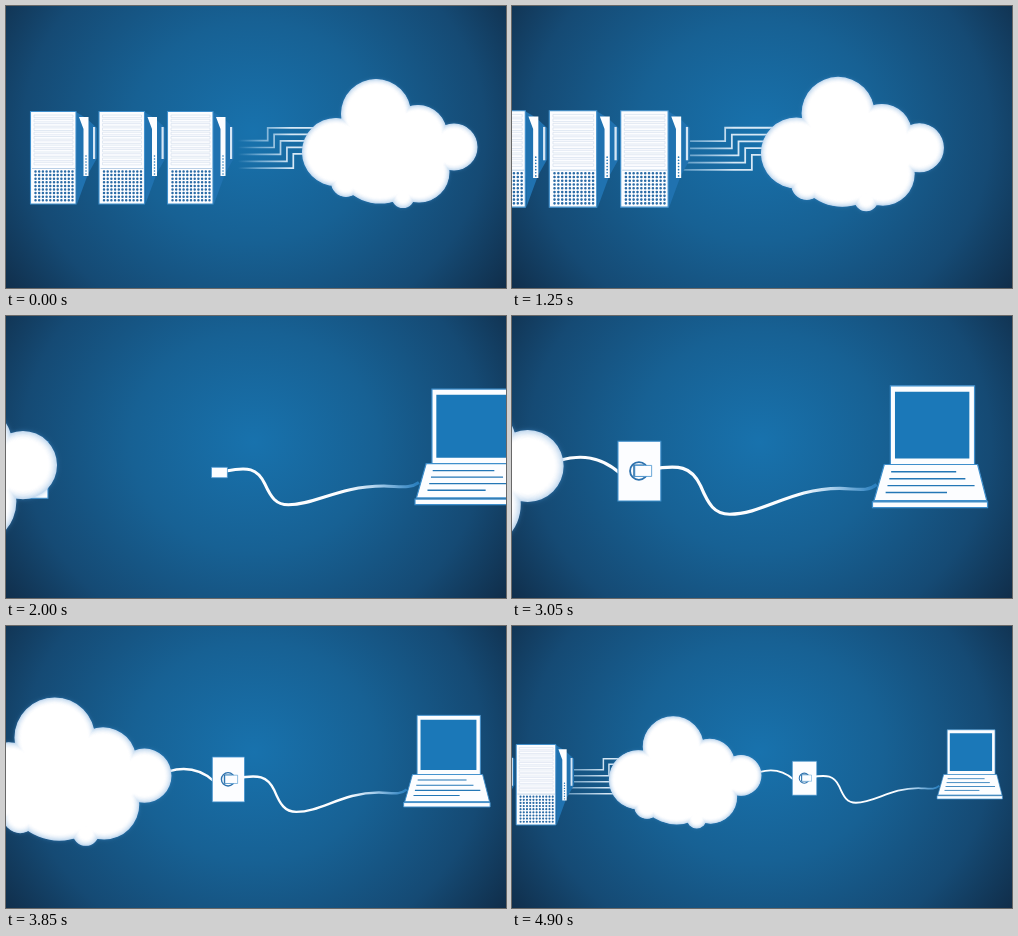
An HTML page with a canvas that plays this animation: 500x282 px, repeating every 4950 ms.

```html
<!DOCTYPE html>
<html lang="en">
<head>
<meta charset="utf-8">
<title>From servers to laptop</title>
<style>
html, body { margin: 0; width: 100%; height: 100%; overflow: hidden; background: #154a74; }
canvas { display: block; width: 500px; height: 282px; }
</style>
</head>
<body>
<canvas id="stage" width="500" height="282"></canvas>
<script>
const ctx = document.getElementById('stage').getContext('2d');
const LOOP = 4950, STEP = 50, PULL_BACK = 3010;
const WHITE = '#fcfdff', BLUE = '#2477b6', EDGE = '#3f8fcc';

// Sine ease from 0 to 1 between two times.
function ease(t, from, to) {
  const u = Math.min(1, Math.max(0, (t - from) / (to - from)));
  return (1 - Math.cos(Math.PI * u)) / 2;
}

function camera(t) {
  let zoom = 1 + 0.555 * ease(t, 1000, 2400);
  let x = 250 + 362 * ease(t, 1000, 2065) - 8 * ease(t, 2050, 2300);
  if (t > PULL_BACK) {
    const u = (t - PULL_BACK) / 1000;
    zoom *= Math.exp(-0.4 * u + 0.049 * u * u);
    x = 771 - 260 / zoom;
  }
  const rise = t > 2200 ? 1 : Math.min(1, (zoom - 1) * 2);
  return { zoom, x, y: 140 + 8.5 * rise };
}

function poly(points, fill, stroke, width = 0.8) {
  ctx.beginPath();
  points.forEach(([x, y]) => ctx.lineTo(x, y));
  ctx.closePath();
  if (fill) { ctx.fillStyle = fill; ctx.fill(); }
  if (stroke) { ctx.strokeStyle = stroke; ctx.lineWidth = width; ctx.stroke(); }
}
function box(x, y, w, h, fill, stroke, width) {
  poly([[x, y], [x + w, y], [x + w, y + h], [x, y + h]], fill, stroke, width);
}
function line(points, stroke, width) {
  ctx.beginPath();
  points.forEach(([x, y]) => ctx.lineTo(x, y));
  ctx.strokeStyle = stroke;
  ctx.lineWidth = width;
  ctx.stroke();
}
function dot(x, y, r) {
  ctx.moveTo(x + r, y);
  ctx.arc(x, y, r, 0, 7);
}
function shifted(dx, draw) {
  ctx.save();
  ctx.translate(dx, 0);
  draw();
  ctx.restore();
}

function background() {
  const g = ctx.createRadialGradient(0, 0, 0, 0, 0, 275);
  g.addColorStop(0, '#1872ad');
  g.addColorStop(0.4, '#176194');
  g.addColorStop(0.75, '#154a74');
  g.addColorStop(1, '#102d49');
  ctx.setTransform(1.12, 0, 0, 1, 248, 126);
  ctx.fillStyle = g;
  ctx.fillRect(-250, -150, 500, 320);
}

function server() {
  poly([[70, 106], [80, 112], [91, 122], [91, 152], [82, 168], [71, 198]], '#2072b0');
  poly([[73, 111], [82.5, 111], [82.5, 170], [77.5, 170], [77.5, 123]], WHITE);
  box(87, 121, 2.2, 32, '#d6e6f5');
  ctx.beginPath();
  for (let y = 150; y < 169; y += 3) dot(80, y, 0.8);
  ctx.fillStyle = BLUE;
  ctx.fill();

  box(24.5, 105.5, 45.5, 92.5, WHITE, EDGE, 1.1);
  for (let y = 109; y < 160; y += 4.3) box(28, y, 39, 2.6, null, '#ccd8ea', 0.55);
  line([[26, 162.5], [69, 162.5]], '#a9c4e0', 0.8);
  ctx.beginPath();
  for (let row = 0; row < 9; row++)
    for (let col = 0; col < 11; col++) dot(29.5 + col * 3.7, 165.5 + row * 3.6, 1.25);
  ctx.fillStyle = '#2a6ba6';
  ctx.fill();
}

function wires(reach) {
  const g = ctx.createLinearGradient(232 - 40 * reach, 0, 285 - 20 * reach, 0);
  g.addColorStop(0, 'rgba(170,208,236,0)');
  g.addColorStop(0.4, 'rgba(170,208,236,.6)');
  g.addColorStop(1, 'rgba(225,239,250,.95)');
  for (let i = 0; i < 5; i++) {
    const x = 261.7 + 6.4 * i, top = 121.8 + 6.5 * i, low = 134.6 + 6.9 * i;
    line([[220, low], [x, low], [x, top], [335, top]], g, 1.7);
  }
}

// Circles that make up the cloud: x, y, radius.
const PUFFS = [[370, 108, 35], [412, 128, 29], [448, 141, 23.5], [425, 147, 22], [330, 146, 34],
  [374, 150, 47.5], [413, 166, 30.5], [397, 190.5, 11.5], [340, 176, 15]];

function cloud(zoom) {
  const layers = 12;
  for (let i = 0; i <= layers; i++) {
    const u = i / layers, mix = (1 - u) ** 1.7;
    ctx.beginPath();
    PUFFS.forEach(([x, y, r]) => dot(x, y, r - 6 * u));
    ctx.fillStyle = `rgb(${255 - 60 * mix},${255 - 38 * mix},${255 - 16 * mix})`;
    ctx.shadowColor = 'rgba(75,150,215,.5)';
    ctx.shadowBlur = i ? 0 : 3 * zoom;
    ctx.fill();
  }
  ctx.shadowBlur = 0;
}

function plate() {
  ctx.beginPath();
  ctx.moveTo(440, 152);
  ctx.bezierCurveTo(452, 149, 462, 139, 469, 137.3);
  ctx.bezierCurveTo(482, 133.5, 495, 134, 508, 145.5);
  ctx.strokeStyle = WHITE;
  ctx.lineWidth = 2.1;
  ctx.stroke();
  box(507, 124.8, 28, 39, WHITE, EDGE, 0.7);
  ctx.beginPath();
  dot(520.7, 144.2, 5.8);
  ctx.strokeStyle = '#2d72ae';
  ctx.lineWidth = 1.2;
  ctx.stroke();
  box(517, 140, 7, 8, '#2468a2');
}

function laptop() {
  box(685, 88.6, 55, 51.4, WHITE, EDGE, 0.8);
  box(688, 92.5, 48.6, 43.5, '#1b78b8');
  poly([[681, 140], [742, 140], [748, 163.6], [674.3, 163.6]], WHITE, EDGE, 0.8);
  box(673.3, 164.4, 75.2, 3.8, WHITE, EDGE, 0.8);
  for (let i = 0; i < 4; i++) {
    const end = i < 3 ? 728 + 6 * i : 722;
    line([[685.5 - 1.2 * i, 144.8 + 4.5 * i], [end, 144.8 + 4.5 * i]], BLUE, 0.95);
  }
}

function cable(plugX, lapX, tilt) {
  // The cord stretches between the plug and the laptop.
  const px = x => x + plugX + (lapX - plugX) * Math.min(1, (x - 518) / 104);
  const py = y => y - plugX / 15 * Math.max(0, (y - 155) / 17);
  const drop = plugX * 0.03 + tilt * 12, sag = drop + tilt * 25;
  const curve = (a, b, c, d, e, f) => ctx.bezierCurveTo(px(a), py(b), px(c), py(d), px(e), py(f));
  const g = ctx.createLinearGradient(px(625), 0, px(674), 0);
  g.addColorStop(0, WHITE);
  g.addColorStop(0.45, '#a9cfec');
  g.addColorStop(1, '#2c80bf');
  ctx.beginPath();
  ctx.moveTo(528 + plugX, 143.2 + drop + tilt * 10);
  curve(547, 140 + sag, 555, 141 + sag, 561, 154);
  curve(566, 166, 570, 172.5, 580, 172.5);
  curve(602, 172.5, 620, 155.5, 652, 155.6);
  curve(664, 156, 670, 158, 676, 153);
  ctx.strokeStyle = g;
  ctx.lineWidth = 2.1;
  ctx.stroke();

  ctx.save();
  ctx.translate(518 + plugX, 144.2 + drop);
  ctx.rotate(tilt);
  box(0, -3.6, 11, 7.2, WHITE, EDGE, 0.5);
  ctx.restore();
}

function render(t) {
  const { zoom, x, y } = camera(t);
  const lapX = 90 * (1 - ease(t, 1600, 2400));
  const plugX = 105 * (1 - ease(t, 1500, 2600));
  const plateX = -93 * (1 - ease(t, 1800, 2400));
  const tilt = 0.31 * (1 - ease(t, 1500, 2050));
  const rackX = t > 2250 ? 28 : 0;

  background();
  ctx.setTransform(zoom, 0, 0, zoom, 250 - x * zoom, y - 140 * zoom);
  shifted(rackX, () => {
    wires(ease(t, 850, 1450));
    for (let i = 0; i < 3; i++) shifted(68.5 * i, server);
  });
  if (t >= 1800) shifted(plateX, plate);
  cloud(zoom);
  cable(plugX, lapX, tilt);
  shifted(lapX, laptop);
}

const start = performance.now();
function tick() {
  const t = (performance.now() - start) % LOOP;
  render(Math.floor(t / STEP) * STEP);
  requestAnimationFrame(tick);
}
tick();
</script>
</body>
</html>
```
